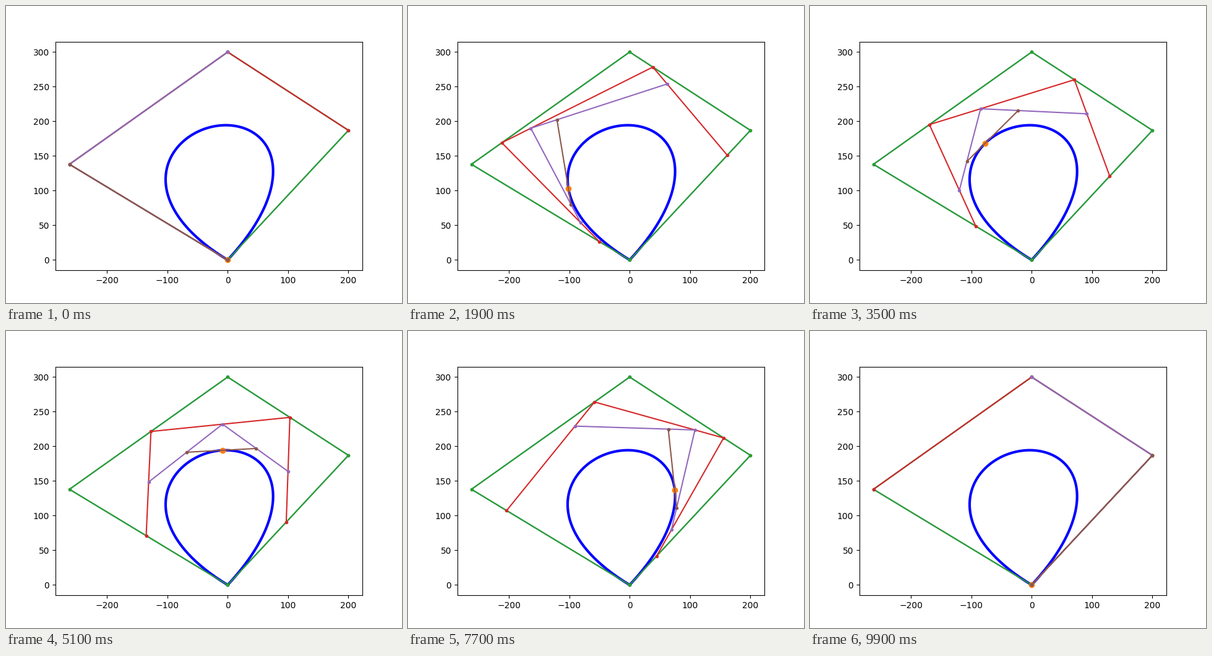
A matplotlib script that plays this animation: 640x480 px, repeating every 10 s.

```python
import numpy as np
import matplotlib.pyplot as plt
from matplotlib.animation import FuncAnimation

FRAMES = 100
CONTROL = np.array([(0, 0), (-262, 138), (0, 300), (200, 187), (0, 0)], float)


def casteljau(t):
    """Return every level of the construction, from control polygon to point."""
    levels = [CONTROL]
    while len(levels[-1]) > 1:
        p = levels[-1]
        levels.append((1 - t) * p[:-1] + t * p[1:])
    return levels


times = np.linspace(0, 1, FRAMES)
curve = np.array([casteljau(t)[-1][0] for t in times])

fig, ax = plt.subplots(figsize=(6.4, 4.8), dpi=100)
ax.plot(*CONTROL.T, ".-", color="C0")
ax.plot(*curve.T, color="blue", lw=3)
point, = ax.plot([0], [0], "o", color="C1")
lines = [ax.plot(*level.T, ".-", color=f"C{i + 2}")[0]
         for i, level in enumerate(casteljau(0)[:-1])]


def update(frame):
    *polygons, tip = casteljau(times[frame])
    for line, polygon in zip(lines, polygons):
        line.set_data(*polygon.T)
    point.set_data(*tip.T)
    return [point, *lines]


anim = FuncAnimation(fig, update, frames=FRAMES, interval=100,
                     repeat=True, repeat_delay=0)
plt.show()
```
